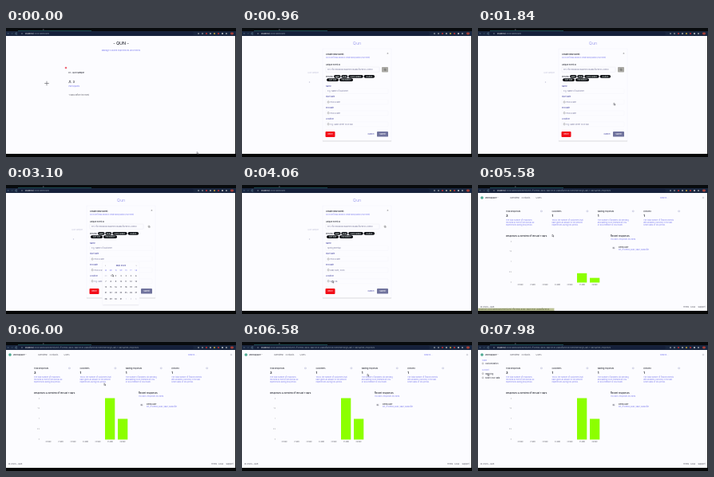
An HTML page with a canvas for the animation above (8000 ms loop, 288 px wide and 162 px high).

```html
<!DOCTYPE html>
<html lang="en">
<head>
<meta charset="utf-8">
<title>Event dashboard</title>
<style>
html, body { margin: 0; width: 100%; height: 100%; overflow: hidden; background: #fff; }
canvas { display: block; width: 288px; height: 162px; }
</style>
</head>
<body>
<canvas id="stage"></canvas>
<script>
const W = 288, H = 162, LOOP = 8000;
const canvas = document.getElementById('stage');
const ctx = canvas.getContext('2d');
const dpr = window.devicePixelRatio || 1;
canvas.width = W * dpr;
canvas.height = H * dpr;

const PAGE = '#fcfcff', INK = '#2a2c36', PURPLE = '#7777ee', GREY = '#85858f', LIME = '#8cff00';
const clamp = v => Math.max(0, Math.min(1, v));
const span = (t, from, to) => clamp((t - from) / (to - from));
const smooth = p => p * p * (3 - 2 * p);

function rect(x, y, w, h, color) {
  ctx.fillStyle = color;
  ctx.fillRect(x, y, w, h);
}

function round(x, y, w, h, r, fill, stroke) {
  ctx.beginPath();
  ctx.roundRect(x, y, w, h, r);
  if (fill) { ctx.fillStyle = fill; ctx.fill(); }
  if (stroke) { ctx.strokeStyle = stroke; ctx.lineWidth = 0.3; ctx.stroke(); }
}

function dot(x, y, r, color) {
  ctx.beginPath();
  ctx.arc(x, y, r, 0, Math.PI * 2);
  ctx.fillStyle = color;
  ctx.fill();
}

function line(color, width, ...p) {
  ctx.beginPath();
  ctx.moveTo(p[0], p[1]);
  for (let i = 2; i < p.length; i += 2) ctx.lineTo(p[i], p[i + 1]);
  ctx.strokeStyle = color;
  ctx.lineWidth = width;
  ctx.stroke();
}

// y is the vertical middle of the text
function text(str, x, y, size = 2.5, color = INK, weight = 400, align = 'left') {
  ctx.font = `${weight} ${size}px Inter, sans-serif`;
  ctx.textAlign = align;
  ctx.textBaseline = 'middle';
  ctx.fillStyle = color;
  ctx.fillText(str, x, y);
}

function browser(t) {
  rect(0, 0, W, 4, '#080b0d');
  rect(15, 3, 92, 1, '#1c4a50');
  rect(0, 4, W, 6, '#1a2740');
  round(15, 4.8, 220, 4.5, 2.2, '#15203a');
  rect(46, 1.5, 1.5, 1, '#667');
  text('‹', 2, 6.8, 4, '#8fb5c4');
  text('›', 7, 6.8, 4, '#5d7b8a');
  ctx.beginPath();
  ctx.arc(13, 7, 1.1, 0.5, 5.6);
  ctx.strokeStyle = '#8fb5c4';
  ctx.lineWidth = 0.5;
  ctx.stroke();
  dot(20, 7, 0.7, '#99a2aa');
  text('localhost', 24, 7, 2.5, '#fff');
  const path = t < 5300
    ? ':3000/dashboard'
    : ':3000/dashboard/events/evt-7f4c19d0-83b2-4a6e-9c51-26d80fa7be34/overview?range=last-7-days&view=responses';
  text(path, 34.8, 7, 2.35, '#8d9aa8');
  ['#8d949b', '#8d949b', '#d33', '#b9b9b9', '#d9b53b', '#d33', '#ddd', '#a8adb2']
    .forEach((c, i) => dot(241 + i * 5, 7, 0.9, c));
  round(281, 5.6, 4, 2.8, 1.4, '#a63f38');
  rect(W - 1, 10, 1, 148, '#16181c');
  rect(0, 158, W, 4, '#050606');
}

function person(x, y, color) {
  dot(x, y - 1.2, 0.65, color);
  line(color, 0.6, x - 1.3, y + 1.5, x - 0.8, y + 0.2, x + 0.8, y + 0.2, x + 1.3, y + 1.5);
}

function home(t) {
  const hover = span(t, 4780, 4940);
  text('- QUN -', 144, 19.3, 5.3, INK, 500, 'center');
  text('Manage Custom Experiences and Events', 144, 27.8, 2.5, PURPLE, 400, 'center');
  if (hover) {
    ctx.save();
    ctx.globalAlpha = hover;
    line('#d3d3dc', 0.4, 74.5, 89.2, 111.5, 89.2);
    line('#efeff5', 0.4, 111.8, 51, 111.8, 89);
    ctx.restore();
  }
  dot(75, 50, 1.3, '#f06a78');
  text('01 - Qun sample', 78, 56, 2.6, hover ? '#4545a0' : INK, 500);
  person(80, 67.6, hover ? '#278b3a' : INK);
  text('3', 83.5, 67.7, 4, INK, 500);
  text('Participants', 78.5, 73.7, 2.45, PURPLE);
  text('11 days before the event', 78.5, 84, 2.25, '#55555e');
  line('#55565c', 0.6, 48.2, 69.5, 53.8, 69.5);
  line('#55565c', 0.6, 51, 66.7, 51, 72.3);
}

function field(label, y, value, icon) {
  text(label, 105, y, 2.4, '#5555aa', 500);
  round(105, y + 3.2, 78, 6.2, 0.8, null, '#f2f2f8');
  if (icon) round(107.2, y + 5.3, 1.9, 2, 0.3, null, '#444');
  text(value, icon ? 110.5 : 107, y + 6.4, 2.4, '#77779d');
}

function typed(str, t, from, to, empty) {
  const n = Math.floor(str.length * span(t, from, to));
  return n ? str.slice(0, n) : empty;
}

function modal(t) {
  rect(101, 26, 86, 116, PAGE);
  line('#f0f0f6', 0.4, 101, 142, 101, 26, 187, 26, 187, 142);
  line('#b4b4bb', 0.5, 101, 142, 187, 142);
  text('Create new Event', 105, 33, 2.65, INK, 600);
  text('×', 182.5, 32, 3.6, '#555', 400, 'center');
  text('Fill in the fields below to create and publish your event', 105, 37.6, 2.15, PURPLE);
  text('Unique Event ID', 105, 46, 2.4, INK, 500);
  round(105, 49, 67, 6.3, 0.8, null, '#dedee9');
  text('evt-7f4c19d083b24a6e9c5126d80fa7be34-2d90c', 107, 52.3, 2.4, '#77779a');
  if (t < 2450) round(175, 49, 8, 6.6, 0.8, '#aaa9a4');
  round(178, 51.1, 1.6, 1.8, 0.3, null, '#555');
  round(178.7, 51.7, 1.6, 1.8, 0.3, null, '#555');
  text('Preview', 105, 61, 2.3, INK, 500);
  [[115, 59, 8.5, 'name'], [124.3, 59, 8, 'email'], [133.2, 59, 18.5, 'event number'],
   [152.6, 59, 13.5, 'location'], [106, 63.3, 15, 'start date'], [122, 63.3, 17, 'end number']]
    .forEach(([x, y, w, s]) => {
      round(x, y, w, 3.7, 1.8, '#090b10');
      text(s, x + w / 2, y + 1.9, 2.1, '#d9e5df', 500, 'center');
    });
  field('Name', 73, typed('Spring meetup', t, 3560, 3860, 'e.g. Name of customer'));
  field('Start date', 86.7, 'Pick a date', true);
  field('End date', 100.4, t < 3380 ? 'Pick a date' : 'May 26th, 2023', true);
  field('Location', 114.4, typed('Main hall', t, 3920, 4100, 'e.g. Main street 12 or hall'), true);
  round(104.5, 130, 12, 7, 0.9, '#f20d18');
  text('Reset', 110.5, 133.6, 2.2, '#fff', 500, 'center');
  text('Cancel', 161.5, 133.5, 2.4, '#5656aa', 500, 'center');
  round(169, 130, 14, 6.6, 0.9, '#70739d');
  text('Submit', 176, 133.4, 2.3, '#fff', 500, 'center');
}

function calendar() {
  round(120.5, 97, 46.5, 54, 1, PAGE, '#ececf3');
  line('#d0d0d8', 0.4, 121.5, 150.8, 166, 150.8);
  text('May 2023', 144, 101.2, 2.6, '#4848a0', 500, 'center');
  text('‹', 124.5, 101, 3.2, GREY, 400, 'center');
  text('›', 163, 101, 3.2, GREY, 400, 'center');
  for (let c = 0; c < 7; c++) {
    const x = 125 + c * 6.3;
    text(['Su', 'Mo', 'Tu', 'We', 'Th', 'Fr', 'Sa'][c], x, 107.3, 2, PURPLE, 400, 'center');
    for (let r = 0; r < 5; r++) {
      const n = r * 7 + c;
      const day = n < 1 ? 30 : n > 31 ? n - 31 : n;
      const out = n < 1 || n > 31;
      text(day, x, 114 + r * 7.2, 2.4, out ? '#b9b9cc' : '#333344', 400, 'center');
    }
  }
}

const CARDS = [
  ['Total Responses', '3', ['The total number of responses', 'received by every form across all', 'experiences during this period.']],
  ['Customers', '1', ['This is the number of customers that', 'have given an answer in the present', 'experiences during this period.']],
  ['Waiting responses', '1', ['The number of answers still pending', 'and waiting to be reviewed by you', 'or by a member of your team.']],
  ['Finished', '1', ['The total number of finished events', 'with answers collected, in the last', 'seven days of this period.']]
];

function dashboard(t) {
  dot(5, 16, 1.8, '#4aa890');
  text('Workspace', 9, 16, 2.7, INK, 500);
  text('⌄', 24, 15.5, 2.6, GREY);
  ['Overview', 'Contacts', 'Users'].forEach((s, i) =>
    text(s, [40, 54.5, 72.5][i], 16, 2.55, '#606069', i ? 400 : 500));
  text('Search...', 228, 16, 2.5, PURPLE);
  dot(282, 16, 1.3, '#d7d8df');

  CARDS.forEach(([title, value, lines], i) => {
    const x = 35 + i * 57.4;
    text(title, x, 33, 2.35, INK, 500);
    round(x + 43.5, 32.1, 1.9, 1.6, 0.4, null, '#777ab0');
    text(value, x, 39, 4, INK, 700);
    lines.forEach((s, k) => text(s, x, 44.3 + k * 3, 2.25, PURPLE));
  });

  text('Responses & overview of the last 7 days.', 35, 63.8, 2.65, INK, 600);
  text('Recent responses', 166, 63.8, 2.75, INK, 600);
  text('You have 3 responses this week.', 166, 68.3, 2.05, PURPLE);
  dot(170, 79, 2, '#eeeef4');
  text('DL', 170, 79.1, 1.9, INK, 500, 'center');
  text('Demo user', 176, 77.8, 2.4, INK, 500);
  text('evt_7f4c19d0_83b2_4a6e_26d80fa7', 176, 81.5, 2.25, PURPLE);

  for (let i = 0; i < 5; i++) text(['2', '1.5', '1', '0.5', '0'][i], 42, 71 + i * 12.9, 2, GREY, 400, 'right');
  const grow = smooth(span(t, 5420, 5944));
  [[124, 52], [140, 26]].forEach(([x, h]) => rect(x, 122.5 - h * grow, 12.3, h * grow, LIME));
  for (let i = 0; i < 7; i++) text(`${20 + i} May`, 53 + i * 15.5, 125.2, 2, '#66666f', 400, 'center');

  text('© 2023 – Qun', 3, 153, 2.6, '#555560');
  text('Terms', 257, 153, 2.4, '#555560');
  text('FAQs', 266.2, 153, 2.4, '#555560');
  text('Support', 275.5, 153, 2.4, '#555560');
  if (t < 5760) {
    rect(0, 154.7, 95.5, 3.3, '#b9bf92');
    text('localhost:3000/dashboard/events/evt-7f4c19d0-83b2-4a6e-9c51-26d80fa7be34', 1, 156.3, 2.3, '#5a6040');
  }
  if (t >= 7740) sidebar();
}

function sidebar() {
  text('Home', 5, 23, 2.2, PURPLE);
  text('Customization', 9, 27.2, 2.45, INK);
  text('Account', 5, 35.2, 2.2, PURPLE);
  text('Invoicing', 9, 39.8, 2.45, INK);
  text('Share your data', 9, 45, 2.45, INK);
  [27, 39.7, 44.9].forEach(y => round(5.2, y - 0.9, 1.7, 1.7, 0.4, null, '#444'));
}

// time, x, y
const PATH = [
  [0, 239, 155.5], [90, 239, 155.5], [480, 51, 70], [650, 51, 70], [1250, 178, 52],
  [1780, 170, 94], [1900, 170, 94], [2440, 114, 106], [2720, 114, 106], [3040, 133, 112],
  [3140, 133, 112], [3340, 156, 135], [3550, 113, 79], [3860, 113, 79], [3950, 113, 120],
  [4080, 113, 120], [4240, 176, 133], [4400, 176, 133], [4900, 93, 63], [5590, 93, 62],
  [6450, 157, 40], [6800, 157, 40], [7440, 17, 22], [7700, 17, 22], [7950, 12, 39.5], [8000, 12, 39.5]
];

function pointer(t) {
  const i = Math.max(1, PATH.findIndex(p => p[0] >= t));
  const [t0, x0, y0] = PATH[i - 1], [t1, x1, y1] = PATH[i];
  const p = smooth(span(t, t0, t1));
  ctx.save();
  ctx.translate(x0 + (x1 - x0) * p, y0 + (y1 - y0) * p);
  ctx.beginPath();
  [[0, 0], [0, 2.8], [0.7, 2.1], [1.3, 3.2], [1.8, 3], [1.2, 1.9], [2.1, 1.9]]
    .forEach(([x, y]) => ctx.lineTo(x, y));
  ctx.closePath();
  ctx.fillStyle = t > 4850 && t < 5300 ? '#f3ba42' : '#fff';
  ctx.fill();
  ctx.strokeStyle = '#30313a';
  ctx.lineWidth = 0.4;
  ctx.stroke();
  ctx.restore();
}

// Page as it stays visible behind the open dialog
function backdrop() {
  rect(0, 10, W, 148, PAGE);
  text('Qun', 144, 19, 5.3, '#a3a3ef', 400, 'center');
  text('Qun sample', 82, 55.8, 2.5, '#c3c3d8');
  dot(84.5, 68, 0.7, '#c3c3d8');
}

function draw(t) {
  ctx.setTransform(dpr, 0, 0, dpr, 0, 0);
  rect(0, 0, W, H, PAGE);
  if (t < 5300) {
    const open = span(t, 600, 740) * (1 - span(t, 4360, 4480));
    home(t);
    if (open) {
      ctx.save();
      ctx.globalAlpha = open;
      backdrop();
      const scale = 0.95 + 0.05 * open;
      ctx.translate(144, 84);
      ctx.scale(scale, scale);
      ctx.translate(-144, -84);
      modal(t);
      ctx.restore();
    }
    if (t >= 2660 && t < 3400) calendar();
  } else {
    dashboard(t);
  }
  browser(t);
  pointer(t);
}

const start = performance.now();
function frame() {
  draw(Math.max(0, performance.now() - start) % LOOP);
  requestAnimationFrame(frame);
}
frame();
</script>
</body>
</html>
```
